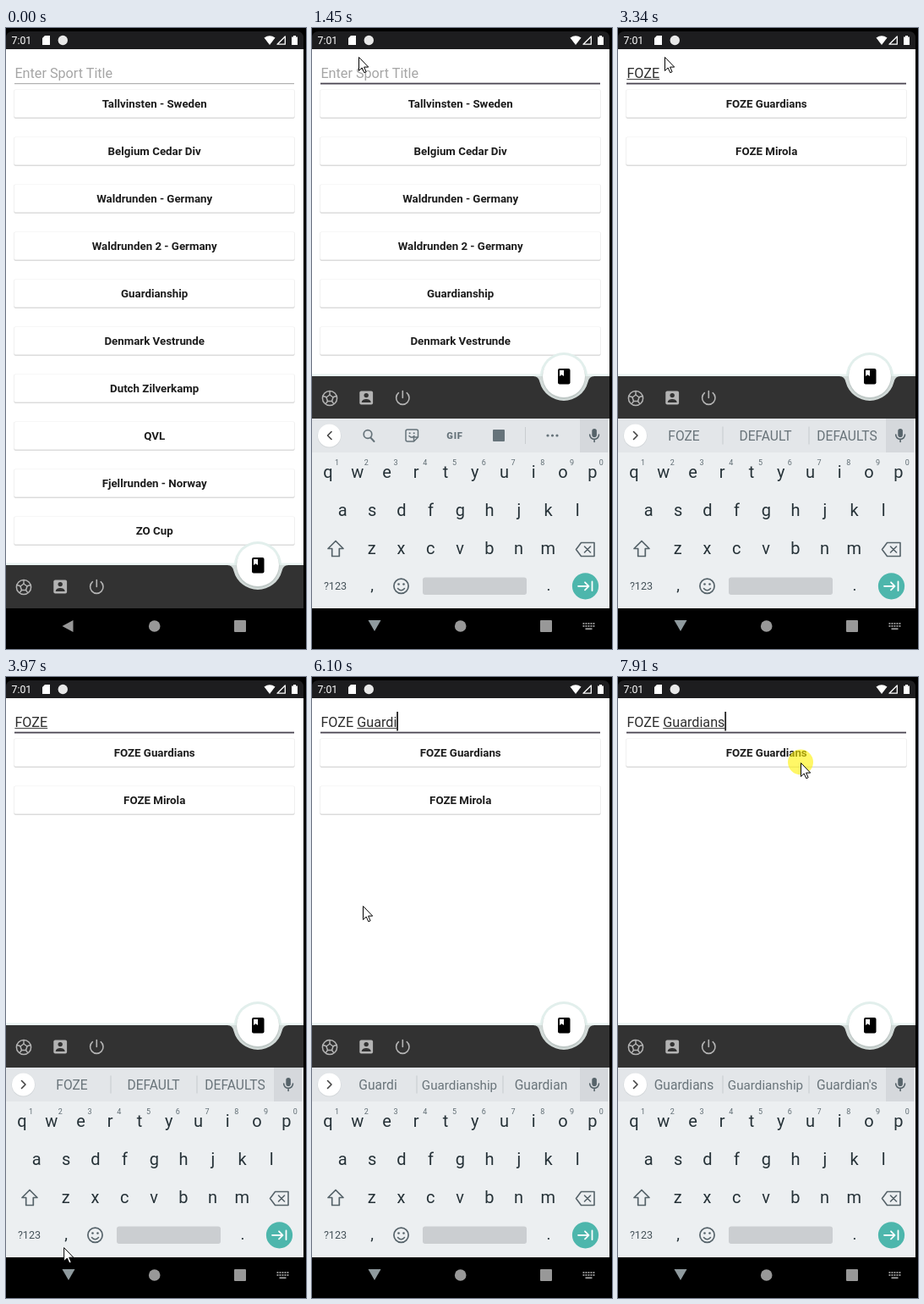
Animation, 355 px wide and 733 px high, one loop 7.99 s. Source, as an HTML page:

```html
<!DOCTYPE html>
<html lang="en">
<head>
<meta charset="utf-8">
<title>League search</title>
<style>
  html, body { margin: 0; width: 100%; height: 100%; overflow: hidden; background: #000; }
  svg { display: block; width: 355px; height: 733px; font-family: Roboto, sans-serif; }
  text { white-space: pre; }
  .mid { text-anchor: middle; }
  .line { fill: none; stroke-linecap: round; stroke-linejoin: round; }
</style>
</head>
<body>
<svg id="stage" viewBox="0 0 355 733"></svg>
<script>
const LOOP = 7990;
const BLINK = 490;
const FOCUS = 955;
const KEYBOARD_UP = 1220;
const LEAGUES = [
  'Tallvinsten - Sweden', 'Belgium Cedar Div', 'Waldrunden - Germany', 'Waldrunden 2 - Germany',
  'Guardianship', 'Denmark Vestrunde', 'Dutch Zilverkamp', 'QVL', 'Fjellrunden - Norway', 'ZO Cup'
];
const FOUND = ['FOZE Guardians', 'FOZE Mirola'];

// time, typed text, suggestions
const TYPING = [
  [1960, 'F', 'F|For|From'],
  [2190, 'FO', 'FO|FOR|FOUR'],
  [2340, 'FOZ', 'FOZ|FOX|FOXES'],
  [2420, 'FOZE', 'FOZE|DEFAULT|DEFAULTS'],
  [5030, 'FOZE ', 'and|is|the'],
  [5390, 'FOZE G', 'G|Good|Great'],
  [5460, 'FOZE Gu', 'Gu|Guess|Guy'],
  [5560, 'FOZE Gua', 'Gua|Guard|Guarantee'],
  [5670, 'FOZE Guar', 'Guar|Guardianship|Guardian'],
  [5870, 'FOZE Guard', 'Guard|Guardianship|Guardian'],
  [6100, 'FOZE Guardi', 'Guardi|Guardianship|Guardian'],
  [6230, 'FOZE Guardia', 'Guardia|Guardianship|Guardian'],
  [6410, 'FOZE Guardian', 'Guardian|Guardianship|Guardians'],
  [6510, 'FOZE Guardians', "Guardians|Guardianship|Guardian's"]
];

// time, x, y of the pointer tip
const POINTER = [
  [300, 307, 709], [480, 190, 330], [660, 97, 66], [1220, 97, 66], [1430, 55, 34],
  [3480, 55, 34], [3670, 56, 545], [3720, 60, 590], [3970, 68, 673], [4180, 101, 699],
  [4460, 85, 649], [4650, 60, 270], [7130, 60, 270], [7330, 35, 318], [7760, 216, 101]
];

const $ = id => document.getElementById(id);
const clamp = v => Math.max(0, Math.min(1, v));
const span = (t, a, b) => clamp((t - a) / (b - a));
const easeOut = p => 1 - (1 - p) ** 3;
const show = (id, on) => $(id).setAttribute('visibility', on ? 'inherit' : 'hidden');
const move = (id, x, y) => $(id).setAttribute('transform', `translate(${x} ${y})`);
const fade = (id, v) => $(id).setAttribute('opacity', v);

const label = (x, y, size, fill, s, extra = 'class="mid"') =>
  `<text x="${x}" y="${y}" font-size="${size}" fill="${fill}" ${extra}>${s}</text>`;
const line = (d, color, width, extra = '') =>
  `<path class="line" d="${d}" stroke="${color}" stroke-width="${width}" ${extra}/>`;
const box = (x, y, w, h, fill, r = 0) =>
  `<rect x="${x}" y="${y}" width="${w}" height="${h}" rx="${r}" fill="${fill}"/>`;
const disc = (x, y, r, fill) => `<circle cx="${x}" cy="${y}" r="${r}" fill="${fill}"/>`;

const card = (name, i) => {
  const y = 73 + 56 * i;
  return box(9, y - .5, 333, 34.2, '#f0f0f0', 2) + box(9.6, y + 30, 331.8, 4, '#dcdcdc', 2) +
    box(10, y, 331, 32.4, '#fff', 1.5) +
    label(175.7, y + 21.4, 13.3, '#1c1c1c', name, 'class="mid" font-weight="700"');
};

function statusBar() {
  return '<path d="M0 25V12Q0 4 8 4H344Q352 4 352 12V25Z" fill="#1d1d1f"/>' +
    label(6.5, 19.3, 12.3, '#fff', '7:01', '') +
    '<path d="M46 9H52V20H43V12Z" fill="#fff"/>' + disc(67.3, 14.5, 5.7, '#e8e8e8') +
    '<path d="M305.5 11.5Q312 7 318.5 11.5L312 20Z" fill="#fff"/>' +
    line('M321 19.2H330.3V10Z', '#fff', 1.3) +
    '<path d="M338 10.5H340V9H343V10.5H345V20H338Z" fill="#fff"/>';
}

function tabBar() {
  const spokes = [0, 1, 2, 3, 4].map(i => line('M21 656V651.8', '#b4b4b4', 1.4, `transform="rotate(${72 * i} 21 660)"`)).join('');
  return box(0, 631.5, 352, 3, '#e9f3f1') + disc(298, 634, 28, '#e2efec') +
    '<path d="M264 634H332V668H264Z" fill="#d2dad8"/>' +
    '<path d="M0 634H262Q268 634 269.5 641A29.5 29.5 0 0 0 326.5 641Q328 634 334 634H352V685H0Z" fill="#323232"/>' +
    disc(298, 635.5, 25.5, '#bfc8c6') + disc(298, 634, 25, '#fff') +
    box(291, 625, 14.5, 18.5, '#000', 2) + '<path d="M293 627H298V634L295.5 632.3L293 634Z" fill="#fff"/>' +
    '<circle cx="21" cy="660" r="8.6" fill="none" stroke="#b4b4b4" stroke-width="1.5"/>' +
    line('M21 656L25 659L23.5 663.5H18.5L17 659Z', '#b4b4b4', 1.5) + spokes +
    box(56.3, 651.5, 15.8, 16, '#b4b4b4', 2) + disc(64.2, 656.6, 2.7, '#323232') +
    '<path d="M58.8 665V664Q60 661 64.2 661Q68.4 661 69.6 664V665Z" fill="#323232"/>' +
    line('M107.3 651.5V659.5M102.4 653.7A7.7 7.7 0 1 0 112.2 653.7', '#b4b4b4', 1.6);
}

function toolbar() {
  const g = '#66737a';
  return line('M23 476.5L18.5 481L23 485.5', '#444', 1.6) +
    line('M73.5 488L69.3 483.5', g, 2) + `<circle cx="66" cy="479.5" r="4.8" fill="none" stroke="${g}" stroke-width="1.7"/>` +
    line('M113 474H123.500Q125.500 474 125.500 476V483L120.500 488H113Q111 488 111 486V476Q111 474 113 474ZM120.500 488V483H125.500M115 481.500Q118 485 121 481.500', g, 1.5) +
    disc(115.7, 478.2, 1, g) + disc(120.7, 478.2, 1, g) +
    label(169, 484.8, 11.2, g, 'GIF', 'class="mid" font-weight="900" letter-spacing=".8"') +
    box(214, 474, 14, 14, g, 1) + box(252, 471, 1, 20, '#c9cdd0') +
    [279, 284.5, 290].map(x => disc(x, 481, 1.6, g)).join('');
}

function suggestions(words) {
  return line('M18.500 476.500L23 481L18.500 485.500', '#444', 1.6) +
    box(123.5, 470.5, 1, 21, '#c6cacd') + box(225.5, 470.5, 1, 21, '#c6cacd') +
    words.map((w, i) => label([78, 174.5, 271][i], 486.8, w.length > 11 ? 15.2 : 15.6, '#69747a', w)).join('');
}

function keyboard() {
  const ink = '#263238', g = '#56636a';
  const row = (keys, x, y) => [...keys].map((k, i) => label(x + 34.75 * i, y, 20, ink, k)).join('');
  const digits = [...'1234567890'].map((k, i) => label(29.5 + 34.75 * i, 516.3, 9, '#5f6c73', k)).join('');
  return box(0, 461, 352, 224, '#eceff1') + box(0, 461, 352, 40, '#e3e6e9') + box(317, 461, 33, 40, '#d5d8dc') +
    disc(20.5, 481.6, 14, '#d3d7da') + disc(20.5, 481, 13.5, '#fff') + '<g id="strip"></g>' +
    box(331.3, 473, 5.6, 10, g, 2.8) + line('M328.700 480A5.400 5.400 0 0 0 339.500 480M334.100 485.500V488.500', g, 1.6) +
    row('qwertyuiop', 19, 530.5) + digits + row('asdfghjkl', 36.3, 575.5) + row('zxcvbnm', 70.8, 621) +
    line('M28 605.500L37 614.500H32.300V623.500H23.700V614.500H19Z', g, 1.7) +
    line('M312.500 615.500L318.500 607.500H334V623.500H318.500ZM322.500 612L329.500 619M329.500 612L322.500 619', g, 1.6) +
    label(27.5, 663.3, 12.6, '#455259', '?123') + label(71, 664, 19, ink, ',') + label(280, 664, 19, ink, '.') +
    `<circle cx="105.500" cy="658.800" r="8.600" fill="none" stroke="${g}" stroke-width="1.700"/>` +
    disc(102.5, 656.5, 1.3, g) + disc(108.5, 656.5, 1.3, g) + line('M101.500 661.500Q105.500 666 109.500 661.500', g, 1.5) +
    box(131, 648.5, 123, 20.5, '#cbced1', 3) + disc(323.5, 658.8, 15.6, '#4db6ac') +
    line('M315 658.800H327M323 654.300L327.500 658.800L323 663.300M331.500 653.500V664', '#fff', 1.8);
}

function navBar() {
  const g = '#989898';
  let dots = '';
  for (let i = 0; i < 10; i++) dots += box(320.5 + i % 5 * 3, 702 + Math.floor(i / 5) * 3, 1.9, 1.9, g);
  return box(0, 685, 355, 48, '#000') +
    `<path id="back" d="M66.500 706L79.500 699V713Z" fill="${g}"/>` +
    '<path id="down" d="M66.500 699H81.500L74 712Z" fill="#8f9a9e"/>' +
    disc(175.7, 706, 6.8, g) + box(270, 699, 14, 14, g, 1) +
    `<g id="imeKey">${dots}${box(323.5, 708.3, 8, 1.9, g)}</g>`;
}

$('stage').innerHTML =
  box(0, 0, 355, 733, '#000') + box(0, 25, 352, 660, '#fff') +
  `<g id="ghosts">${LEAGUES.map((n, i) => box(10, 73 + 56 * i, 331, 33, '#fbfbfb')).join('')}</g>` +
  `<g id="leagues">${LEAGUES.map(card).join('')}</g>` +
  `<g id="found">${FOUND.map((n, i) => `<g id="found${i}">${card(n, i)}</g>`).join('')}</g>` +
  '<rect id="rule" x="10" width="331"/>' +
  label(10.4, 58.8, 16.2, '#a6a6a6', 'Enter Sport Title', 'id="hint"') +
  label(10.4, 58.8, 16.2, '#2e2e2e', '', 'id="typed"') +
  '<rect id="mark" y="60" height="1" fill="#444"/>' +
  '<rect id="caret" y="41" width="1.800" height="22.500" fill="#222"/>' +
  `<g id="bar">${tabBar()}</g><g id="keys">${keyboard()}</g>` +
  navBar() + box(352, 0, 3, 733, '#000') + statusBar() +
  '<circle id="halo" fill="#fff200" fill-opacity=".600"/>' +
  '<path id="pointer" d="M.500 .500V16.500L4.200 13L6.800 18.700L9.100 17.700L6.600 12.100H11.700Z" fill="#fff" stroke="#000"/>';

const pen = document.createElement('canvas').getContext('2d');
const widthOf = s => {
  pen.font = '16.2px Roboto, sans-serif';
  return pen.measureText(s).width;
};

let stripKey = null;
function setStrip(key) {
  if (key === stripKey) return;
  stripKey = key;
  $('strip').innerHTML = key ? suggestions(key.split('|')) : toolbar();
}

function drawField(t) {
  const [since, text, words] = TYPING.findLast(k => t >= k[0]) || [FOCUS, '', ''];
  const focused = t >= FOCUS;
  const rule = $('rule');
  rule.setAttribute('y', focused ? 64.7 : 65.2);
  rule.setAttribute('height', focused ? 1.8 : 1);
  rule.setAttribute('fill', focused ? '#4b4652' : '#a0a0a0');
  show('hint', !text);
  $('typed').textContent = text;
  const end = 10.4 + widthOf(text);
  const start = 10.4 + widthOf(text.slice(0, text.lastIndexOf(' ') + 1));
  $('mark').setAttribute('x', start);
  $('mark').setAttribute('width', Math.max(0, end - start));
  $('caret').setAttribute('x', end - .2);
  show('caret', focused && Math.floor((t - since) / BLINK) % 2 === 0);
  setStrip(words);
}

function drawList(t) {
  fade('leagues', 1 - span(t, 2900, 3040));
  show('ghosts', t >= 2900 && t < 3100);
  show('found', t >= 3060);
  move('found', 0, 900 * (1 - easeOut(span(t, 3060, 3310))));
  fade('found1', 1 - span(t, 7010, 7150));
}

function drawKeyboard(t) {
  const up = t >= KEYBOARD_UP;
  move('keys', 0, 224 * (1 - easeOut(span(t, KEYBOARD_UP, 1430))));
  show('keys', up);
  move('bar', 0, t >= 1290 ? -223 : 0);
  show('back', !up);
  show('down', up);
  show('imeKey', t >= 1040);
}

function drawPointer(t) {
  show('pointer', t >= POINTER[0][0]);
  const i = POINTER.findLastIndex(p => t >= p[0]);
  const a = POINTER[Math.max(0, i)], b = POINTER[i + 1] || a;
  const p = a === b ? 0 : span(t, a[0], b[0]);
  const x = a[1] + (b[1] - a[1]) * p, y = a[2] + (b[2] - a[2]) * p;
  move('pointer', x, y);
  move('halo', x, y - .5);
  const late = t >= 7860;
  show('halo', late || t >= 810 && t < 1000);
  $('halo').setAttribute('r', 15 * (.65 + .35 * span(t, late ? 7860 : 810, late ? 7910 : 860)));
  fade('halo', late ? 1 : 1 - span(t, 920, 1000));
}

const begin = performance.now();
function frame() {
  const t = (performance.now() - begin) % LOOP;
  drawField(t);
  drawList(t);
  drawKeyboard(t);
  drawPointer(t);
  requestAnimationFrame(frame);
}
frame();
</script>
</body>
</html>
```
